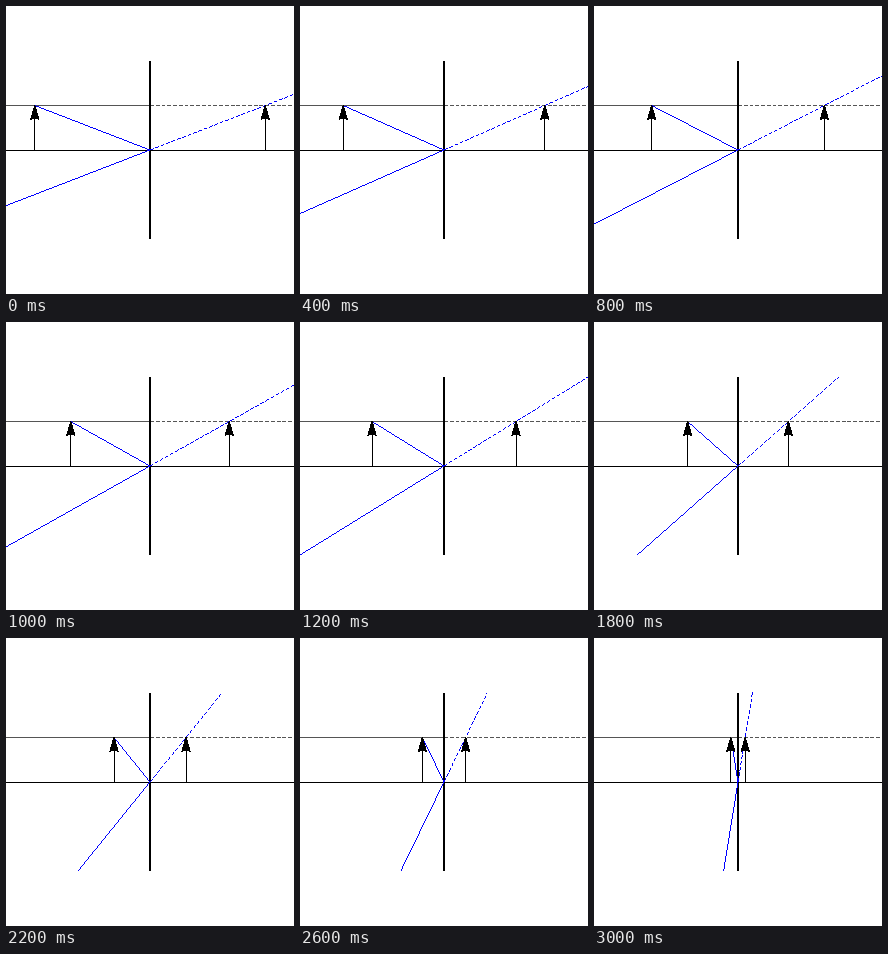
An HTML page with a canvas that plays this animation: 288x288 px, repeating every 3.2 s.

```html
<!DOCTYPE html>
<html>
<head>
<meta charset="utf-8">
<title>Mirror ray</title>
<style>
html, body { margin: 0; width: 100%; height: 100%; overflow: hidden; background: #fff; }
canvas { display: block; width: 288px; height: 288px; image-rendering: pixelated; }
</style>
</head>
<body>
<canvas id="stage" width="288" height="288"></canvas>
<script>
const ctx = document.getElementById('stage').getContext('2d');
const SIZE = 288, MID = 144, TOP = 55, BOTTOM = 233;
const TIP = 99.5, HEIGHT = MID - TIP;
const STEPS = 16, STEP_MS = 200;
const DASH = { on: 3.9, period: 5.76 };

// Crisp one-pixel line, stepped along its longer axis.
function line(x0, y0, x1, y1, color, dash) {
  const dx = x1 - x0, dy = y1 - y0, len = Math.hypot(dx, dy);
  const steep = Math.abs(dy) > Math.abs(dx);
  const a = steep ? y0 : x0, b = steep ? y1 : x1;
  ctx.fillStyle = color;
  for (let p = Math.floor(Math.min(a, b)); p < Math.max(a, b); p++) {
    const t = Math.min(1, Math.max(0, (p + 0.5 - a) / (b - a)));
    if (dash && (t * len) % dash.period > dash.on) continue;
    const x = steep ? Math.floor(x0 + dx * t) : p;
    const y = steep ? p : Math.floor(y0 + dy * t);
    ctx.fillRect(x, y, 1, 1);
  }
}

function arrow(x) {
  const headLen = 15, notch = 13.5, half = 4.3;
  ctx.fillStyle = '#000';
  ctx.fillRect(Math.floor(x), 100, 1, 45);
  for (let row = 0; row < headLen; row++) {
    const h = row + 0.5, w = half * h / headLen;
    const left = Math.floor(x - w), right = Math.ceil(x + w);
    if (h <= notch) {
      ctx.fillRect(left, 99 + row, right - left, 1);
    } else {
      const gap = half * (h - notch) / (headLen - notch);
      const inL = Math.round(x - gap), inR = Math.round(x + gap);
      ctx.fillRect(left, 99 + row, Math.max(0, inL - left), 1);
      ctx.fillRect(inR, 99 + row, Math.max(0, right - inR), 1);
    }
  }
}

function draw(step) {
  const d = MID * 0.8 * (1 - step / STEPS);
  const reach = Math.min(MID, 2 * d), rise = reach * HEIGHT / d;
  ctx.fillStyle = '#fff';
  ctx.fillRect(0, 0, SIZE, SIZE);

  line(0, TIP, MID, TIP, '#555');
  line(MID, TIP, SIZE, TIP, '#555', DASH);
  ctx.fillStyle = '#000';
  ctx.fillRect(0, MID, SIZE, 1);
  ctx.fillRect(MID - 1, TOP, 2, BOTTOM - TOP);

  line(MID - d, TIP, MID, MID, '#00f');
  line(MID, MID, MID - reach, MID + rise, '#00f');
  line(MID, MID, MID + reach, MID - rise, '#00f', DASH);
  arrow(MID - d);
  arrow(MID + d);
}

const start = performance.now();
function tick() {
  const t = performance.now() - start;
  draw(Math.floor(t / STEP_MS) % STEPS);
  requestAnimationFrame(tick);
}
draw(0);
requestAnimationFrame(tick);
</script>
</body>
</html>
```
